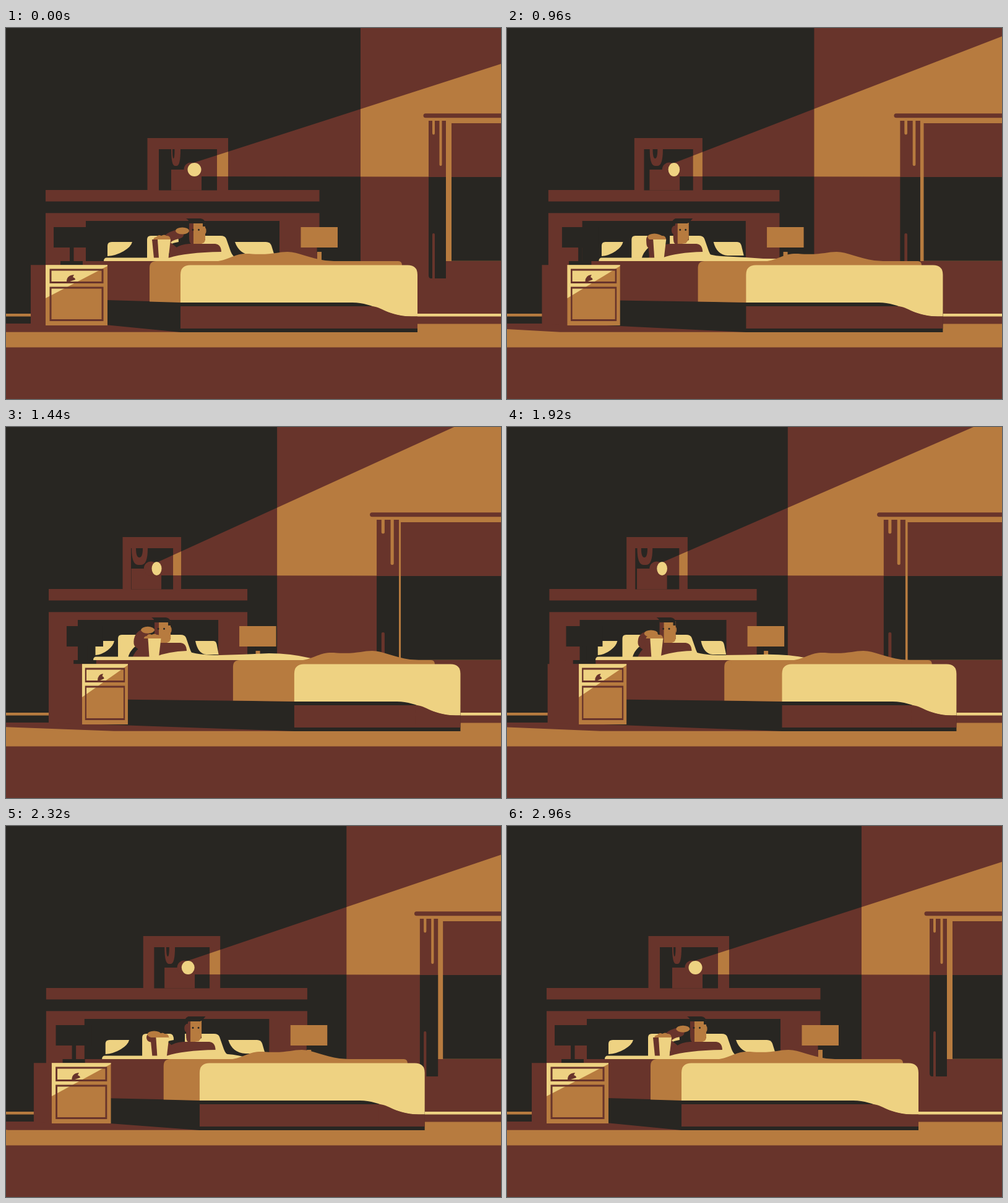
Write an HTML page with a canvas that moves like this. It is 800 by 600 pixels and loops after 3 s.

```html
<!DOCTYPE html>
<html>
<head>
<meta charset="utf-8">
<style>
html, body { margin: 0; width: 100%; height: 100%; overflow: hidden; background: #282622; }
canvas { display: block; }
</style>
</head>
<body>
<canvas id="stage" width="800" height="600"></canvas>
<script>
const ctx = document.getElementById('stage').getContext('2d');
const DARK = '#282622', BROWN = '#68342b', ORANGE = '#b77b3f', YELLOW = '#eed282';
const LOOP = 3000, STEP = 40, BITE = 1500;

// Camera position: 0 = start view, 1 = panned view.
let p = 0;

const mix = (a, b, k) => a + (b - a) * k;
const clamp = v => Math.max(0, Math.min(1, v));
const smooth = v => { v = clamp(v); return v * v * (3 - 2 * v); };
const X = (a, b) => mix(a, b, p);

function ease(v) {
  v = clamp(v);
  const half = u => Math.pow(2 * u, 2.8) / 2;
  return v < 0.5 ? half(v) : 1 - half(1 - v);
}

// Stretch the following drawing so that x = a lands on a..a1 and b on b..b1.
function plane(a, a1, b, b1) {
  const left = X(a, a1), s = (X(b, b1) - left) / (b - a);
  ctx.setTransform(s, 0, 0, 1, left - a * s, 0);
}
const shift = dx => ctx.setTransform(1, 0, 0, 1, dx, 0);
const flat = () => shift(0);

function fill(color, d) {
  ctx.fillStyle = color;
  ctx.fill(new Path2D(d));
}
function box(color, l, t, r, b) {
  ctx.fillStyle = color;
  ctx.fillRect(l, t, r - l, b - t);
}
function oval(color, x, y, rx, ry = rx) {
  ctx.fillStyle = color;
  ctx.beginPath();
  ctx.ellipse(x, y, rx, ry, 0, 0, 7);
  ctx.fill();
}

function room() {
  const corner = X(573, 438);
  box(DARK, 0, 0, 800, 600);
  box(ORANGE, 0, 462, corner, 466.5);
  box(BROWN, corner, 0, 800, 480);
  box(YELLOW, corner, 462, 800, 466.5);
  box(ORANGE, 0, 478.5, 800, 517);
  box(BROWN, 0, 516.5, 800, 600);
  fill(BROWN, `M-100 478H${X(282, 466)}V491.7H${X(-31, 175)}L-100 481.5Z`);
  return corner;
}

function shelf() {
  plane(64, 69, 506.5, 390);
  box(BROWN, 64, 262, 506.5, 280.5);
  box(BROWN, 64, 299.3, 506.5, 384);
  plane(129, 116, 442, 343);
  box(DARK, 129, 312, 442, 377);
  plane(228.5, 188.5, 359, 283);
  box(BROWN, 228.5, 178, 359, 263);
  plane(247, 202, 341, 270);
  box(DARK, 247, 196, 341, 262.5);
}

function beam(corner) {
  flat();
  const apex = X(300, 244);
  ctx.save();
  ctx.clip(new Path2D(`M${apex} 219L${X(980, 724)} 0H1100V241L${apex} 240Z`));
  box(BROWN, 0, 0, corner, 260);
  box(ORANGE, X(341, 270), 178, X(359, 283), 262);
  box(ORANGE, corner, 0, 800, 260);
  ctx.restore();
}

function projector() {
  plane(267, 203, 282, 229);
  fill(BROWN, 'M267 196H282Q282 223 276 223H273Q267 223 267 196Z');
  flat();
  const l = X(269, 210), r = X(272.5, 221);
  fill(DARK, `M${l} 196H${r}Q${r} 211 ${(l + r) / 2} 211Q${l} 211 ${l} 196Z`);
  plane(267, 202.5, 316, 251);
  box(BROWN, 267, 229, 316, 262.5);
  oval(BROWN, 299, 229, 11.5);
  plane(293.5, 235.5, 315.5, 251.5);
  oval(YELLOW, 304.5, 229, 11);
}

function windowSide() {
  flat();
  const jamb = X(711, 634.5), pane = X(720, 638);
  box(ORANGE, jamb, 145, 800, 377);
  box(BROWN, pane, 154, 800, 241);
  box(DARK, pane, 241, 800, 376.7);
  plane(683, 599, 711, 635);
  box(BROWN, 683, 150, 711, 241);
  fill(DARK, 'M683 241H711V405H687Q683 405 683 400Z');
  fill(ORANGE, 'M689 150H693V170Q693 172.500 691 172.500T689 170Z');
  fill(ORANGE, 'M700.500 150H704.500V221Q704.500 223 702.500 223T700.500 221Z');
  fill(BROWN, 'M689 405V334Q689 332 691 332T693 334V405Z');
  shift(X(0, -86.5));
  fill(BROWN, 'M678 138.300H900V145.200H678Q674.500 145 674.500 141.700T678 138.300Z');
}

function rightLamp() {
  shift(X(0, -99.5));
  box(DARK, 502.5, 355, 510, 363);
  box(ORANGE, 503, 362, 510, 377);
  box(ORANGE, 476.5, 322, 536, 355);
}

function pillows() {
  plane(164, 144.5, 204, 175);
  fill(YELLOW, 'M164 369V352Q164 346 171 346H204Q202 354 190 361T164 369Z');
  plane(370, 306, 433, 343);
  fill(YELLOW, 'M370 346H420Q427 346 429 352L434 368H400Q377 367 370 346Z');
  shift(X(0, -47));
  fill(YELLOW, 'M228 374V342Q228 336 234 336H273Q279 336 279 346Q249 351 244 374Z');
  shift(X(0, -65));
  fill(YELLOW, 'M300 372V336H347Q354 336 356 341L363 361Q366 369 372 372Z');
}

// Hand path during one bite: time, x, y.
const HAND = [[0, 285, 328], [420, 246, 334], [640, 238, 328],
              [820, 242, 337], [960, 248, 338], [1500, 285, 328]];

function handAt(q) {
  const i = HAND.findIndex(k => k[0] > q);
  const [t0, x0, y0] = HAND[i - 1], [t1, x1, y1] = HAND[i];
  const k = smooth((q - t0) / (t1 - t0));
  const x = mix(x0, x1, k);
  const near = clamp((x - 246) / 39);
  return [x - p * mix(15, 56, near), mix(y0, y1, k)];
}

function head(turn) {
  const T = (a, b) => mix(a, b, turn);
  const l = T(296, 300.5), edge = T(303, 307.5), r = T(322, 325.5);
  oval(ORANGE, T(321, 315), 328, 2.6, 5);
  oval(BROWN, T(303, 300.5), 327, 2.8, 6);
  fill(BROWN, `M${l} 314H${r}V343L${edge + 6} 349H${l + 3}Q${l} 348 ${l} 338Z`);
  fill(ORANGE, `M${edge} 314H${r}V${T(340, 336)}Q${r} ${T(347, 343)} ${T(318, 321)} 348L${T(316, 314)} 349H${edge}Z`);
  fill(DARK, `M${T(291, 304)} 308H${T(314, 332)}Q${T(321, 331)} 309 ${T(322, 326)} 315`
    + `V${T(321, 315)}H${T(318, 324)}V316H${T(302, 304)}L${T(297, 303)} ${T(316, 320)}H${T(296, 299)}`
    + `V314Q${T(295, 299)} 310 ${T(291, 304)} 308Z`);
  oval(DARK, T(302, 311.5), 326.3, 1.4, 1.6);
  oval(DARK, T(311.5, 320.5), 326.3, 1.4, 1.6);
}

function person(q) {
  const turn = q < 900 ? smooth((q - 440) / 180) : 1 - smooth((q - 1100) / 250);
  const [hx, hy] = handAt(q);
  shift(X(0, -56));
  head(turn);
  fill(BROWN, 'M260 374Q268 351 296 349H338Q348 350 348 363L300 374Z');

  flat();
  ctx.strokeStyle = BROWN;
  ctx.lineWidth = 15;
  ctx.lineCap = ctx.lineJoin = 'round';
  ctx.beginPath();
  ctx.moveTo(X(275, 232), 364);
  ctx.lineTo(X(258, 214), 350);
  ctx.quadraticCurveTo(X(257, 213), 338, hx - 5, hy + 5);
  ctx.stroke();
  oval(ORANGE, hx, hy, 11, 5.5);

  shift(X(0, -15.5));
  fill(ORANGE, 'M238 344Q238 338 243 338Q246 333 251 336Q256 333 259 336Q266 335 266 344Z');
  fill(BROWN, 'M236 342H247L248 372H239Z');
  fill(YELLOW, 'M245 342H266L262.500 372H247Z');
}

function sheet() {
  flat();
  const l = X(158, 141);
  fill(YELLOW, `M${l} 377Q${l} 371.500 ${l + 5} 371.500H${X(264, 242)}`
    + `Q${X(290, 262)} 363 ${X(348, 292)} 362Q${X(358, 308)} 369 ${X(371, 345)} ${X(370, 369)}`
    + `Q${X(388, 385)} ${X(374, 368)} ${X(400, 425)} ${X(382, 366)}`
    + `Q${X(430, 460)} ${X(382, 366)} ${X(440, 493)} 374V378H${l}Z`);
}

function bed() {
  flat();
  const back = X(145, 83), front = X(282, 466), band = X(232, 367), end = X(665, 734.5);
  fill(DARK, `M${back} 438L${front} 443H${end - 30}V450H${end}V492H${front}L${back} 478.500Z`);
  fill(BROWN, `M${back} 383Q${back} 377 ${back + 6} 377H${front + 20}V444L${back} 439.500Z`);
  box(BROWN, front, 450, end, 486);
  fill(ORANGE, `M${band} 442.500V388Q${band} 377 ${band + 11} 377H${front + 40}V444H${front}Z`);

  const tail = X(640, 693), h = x => X(x, x + 137);
  fill(ORANGE, `M${band + 11} 377H${h(343)}C${h(365)} 373 ${h(370)} 364 ${h(393)} 365`
    + `C${h(428)} 368 ${h(438)} 362 ${h(455)} 362C${h(472)} 362 ${h(492)} 373 ${h(516)} 376`
    + `L${h(530)} 377H${tail - 6}Q${tail} 377 ${tail} 384H${band + 11}Z`);

  const dip = X(560, 632), low = X(655, 727);
  fill(YELLOW, `M${front} 444V399Q${front} 383.500 ${front + 16} 383.500H${end - 16}`
    + `Q${end} 383.500 ${end} 399V466.500H${low}C${low - 40} 466 ${dip + 35} 444 ${dip} 444Z`);
  // The skirt under the hanging corner of the blanket.
  fill(BROWN, `M${end} 466.500H${low}C${low - 40} 466 ${dip + 48} 450 ${dip + 30} 450V480H${end}Z`);
}

function leftLamp() {
  plane(77, 98, 135, 157);
  box(DARK, 77, 322, 135, 355);
  box(DARK, 103, 354, 109.5, 378);
  box(DARK, 88, 377, 124, 383.5);
}

function nightstand() {
  flat();
  const l = X(40, 69), r = X(66, 125);
  fill(BROWN, `M${l} 383.300H${r}V481H${r - 2}L${l} 478Z`);
  plane(64, 123, 164, 197);
  box(ORANGE, 64, 383.3, 164, 481);
  fill(YELLOW, 'M64 383.300H164V385L64 437Z');
  ctx.strokeStyle = BROWN;
  ctx.lineWidth = 3;
  ctx.lineJoin = 'miter';
  ctx.strokeRect(72, 391, 84, 20.5);
  ctx.strokeRect(72, 420, 84, 52.5);
  fill(BROWN, 'M98 410Q98 400 110 399L108 403Q112 404 112 407L103 410Z');
}

function draw(t) {
  const pan = t < 1580 ? ease((t - 279) / 1300) : 1 - ease((t - 1584) / 1112);
  p = pan * 1.006;
  flat();
  const corner = room();
  shelf();
  beam(corner);
  projector();
  windowSide();
  rightLamp();
  pillows();
  person(t % BITE);
  sheet();
  bed();
  leftLamp();
  nightstand();
}

const start = performance.now();
function tick() {
  const t = Math.max(0, performance.now() - start) % LOOP;
  draw(Math.floor(t / STEP) * STEP);
  requestAnimationFrame(tick);
}
tick();
</script>
</body>
</html>
```
